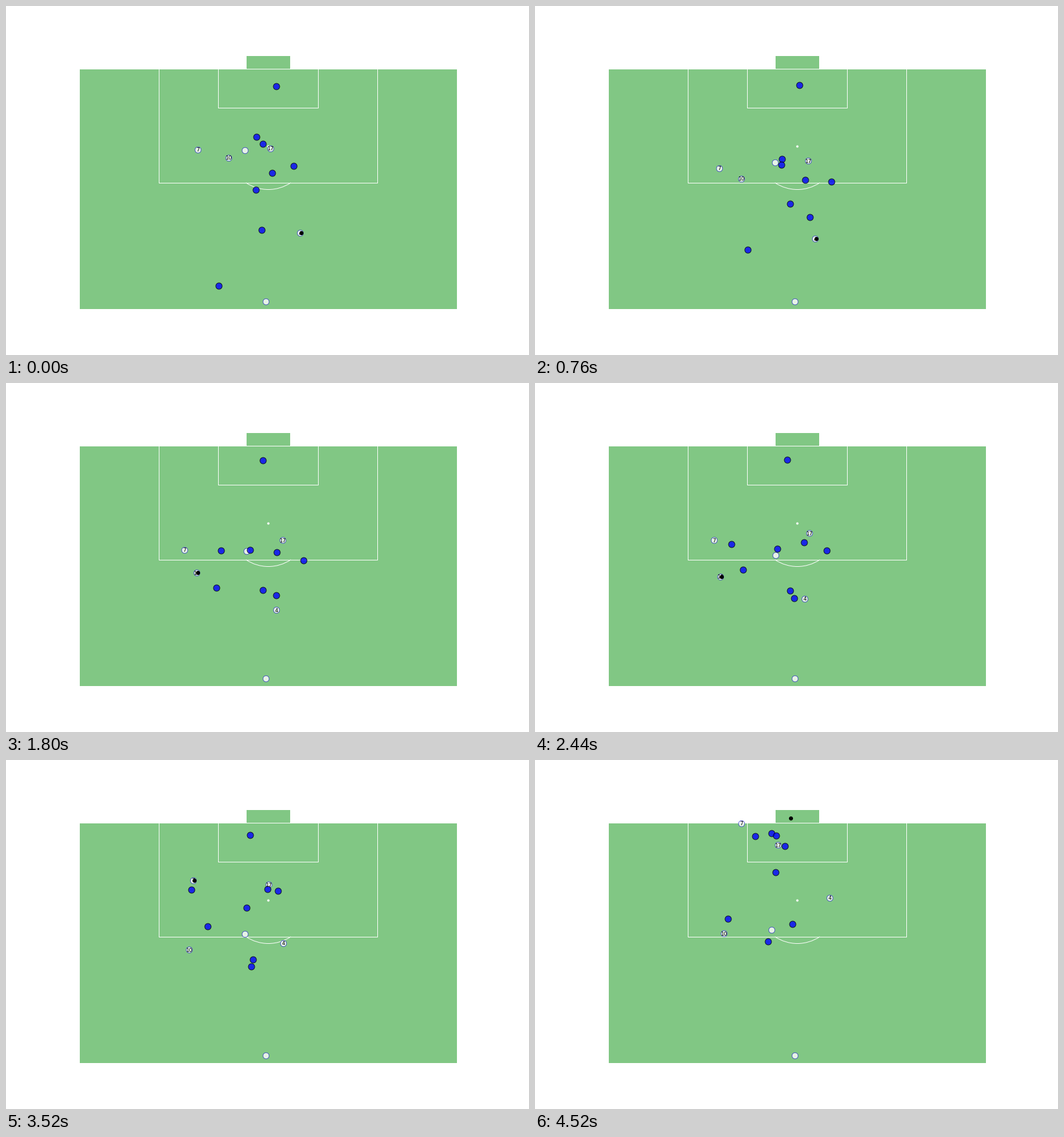
Write a matplotlib script that moves like this. It is 900 by 600 pixels and loops after 4800 ms.

```python
import numpy as np
import matplotlib.pyplot as plt
from matplotlib.animation import FuncAnimation
from matplotlib.patches import Arc, Rectangle

WIDTH, HEIGHT, DPI = 900, 600, 72
STEP, FRAMES, END = 40, 120, 4520
GREEN = "#81c784"

# A run is the lowest polynomial through its points: standing (1), straight (2),
# one bend (3) or two bends (4). These are the moments (s) the points are reached.
MOMENTS = {1: [0], 2: [0, 4.52], 3: [0, 2.44, 4.52], 4: [0, 0.76, 2.92, 4.52]}

ATTACK = {
    "7": [(330, 247), (317, 279), (312, 248), (355, 109)],
    "10": [(383, 261), (319, 333), (325, 298)],
    "17": [(455, 245), (472, 258), (418, 146)],
    "4": [(506, 390), (464, 371), (507, 237)],
    "": [(411, 248), (414, 296), (407, 292)],
    " ": [(447, 508)],
}
DEFENCE = [
    [(465, 138), (407, 126)],
    [(431, 225), (417, 285), (414, 193)],
    [(458, 287), (463, 274), (430, 148)],
    [(442, 237), (424, 273), (322, 259), (379, 131)],
    [(495, 275), (502, 288), (415, 130)],
    [(366, 481), (358, 321), (332, 273)],
    [(430, 316), (439, 357), (401, 312)],
    [(440, 385), (473, 363), (432, 369), (443, 282)],
]
GOAL = (440, 100)
# Each kick: start and end in ms, who kicks, who receives (None is the goal).
KICKS = [(800, 1720, "4", "10"), (2440, 3400, "10", "7"), (3760, 4440, "7", None)]


def fit(points):
    return np.polyfit(MOMENTS[len(points)], np.array(points, float), len(points) - 1)


WHITE_RUNS = {name: fit(points) for name, points in ATTACK.items()}
BLUE_RUNS = [fit(points) for points in DEFENCE]


def position(run, t):
    powers = (t / 1000) ** np.arange(len(run))[::-1]
    return np.round(powers @ run)


def at_feet(name, t):
    return position(WHITE_RUNS[name], t) + (2, 0) if name else np.array(GOAL)


def ball_position(t):
    holder = KICKS[0][2]
    for start, end, kicker, receiver in KICKS:
        if start <= t < end:
            u = (t - start) / (end - start)
            u *= 1.5 - 0.5 * u  # the ball slows down on the way
            return np.round((1 - u) * at_feet(kicker, start) + u * at_feet(receiver, end))
        if t >= end:
            holder = receiver
    return at_feet(holder, t)


fig = plt.figure(figsize=(WIDTH / DPI, HEIGHT / DPI), dpi=DPI, facecolor="white")
ax = fig.add_axes([0, 0, 1, 1])
ax.set(xlim=(0, WIDTH), ylim=(HEIGHT, 0))
ax.axis("off")

for x, y, w, h in [(127, 109, 649, 412), (414, 86, 75, 22)]:
    ax.add_patch(Rectangle((x, y), w, h, fc=GREEN, lw=0, zorder=0))
for left, right, bottom in [(263, 639, 304), (365, 537, 175)]:
    ax.plot([left, left, right, right], [109, bottom, bottom, 109],
            color="white", lw=1, zorder=1)
ax.add_patch(Arc((451.5, 241), 143.4, 149, theta1=58.4, theta2=121.6,
                 ec="white", lw=1, zorder=1))
ax.plot(451, 241, "o", ms=4, mfc="white", mew=0, zorder=1)


class Layer:
    """One drawing of all players and the ball."""

    def __init__(self, z):
        def dots(z, **style):
            return ax.plot([], [], "o", zorder=z, **style)[0]

        self.white = dots(z, ms=10.5, mfc="white", mec="#1414c8", mew=0.8)
        self.blue = dots(z, ms=11, mfc="blue", mec="black", mew=1)
        self.ball = dots(z + 0.2, ms=7, mfc="black", mew=0)
        self.labels = [ax.text(0, 0, name, size=9, family="DejaVu Sans", color="black",
                               ha="center", va="center", zorder=z + 0.1)
                       for name in ATTACK]
        self.artists = [self.white, self.blue, self.ball, *self.labels]

    def show(self, t, alpha):
        whites = np.array([position(run, t) for run in WHITE_RUNS.values()])
        blues = np.array([position(run, t) for run in BLUE_RUNS])
        for dots, places in [(self.white, whites), (self.blue, blues)]:
            dots.set_data(*places.T)
            dots.set_alpha(alpha)
        for label, (x, y) in zip(self.labels, whites):
            label.set_position((x + 0.5, y + 1))
        self.ball.set_data(*ball_position(t)[:, None])

    def set_visible(self, visible):
        for artist in self.artists:
            artist.set_visible(visible)


echo, main = Layer(2), Layer(3)


def update(n):
    t = min(n * STEP, END)
    doubled = n % 13 == 8 and t < END  # two neighbouring moments overlap
    echo.set_visible(doubled)
    if doubled:
        echo.show(t - STEP / 2, 1)
        main.show(t + STEP / 2, 1)
    else:
        main.show(t, 0.8)
    return echo.artists + main.artists


anim = FuncAnimation(fig, update, frames=FRAMES, interval=STEP, repeat=True,
                     repeat_delay=0, blit=False)
plt.show()
```
